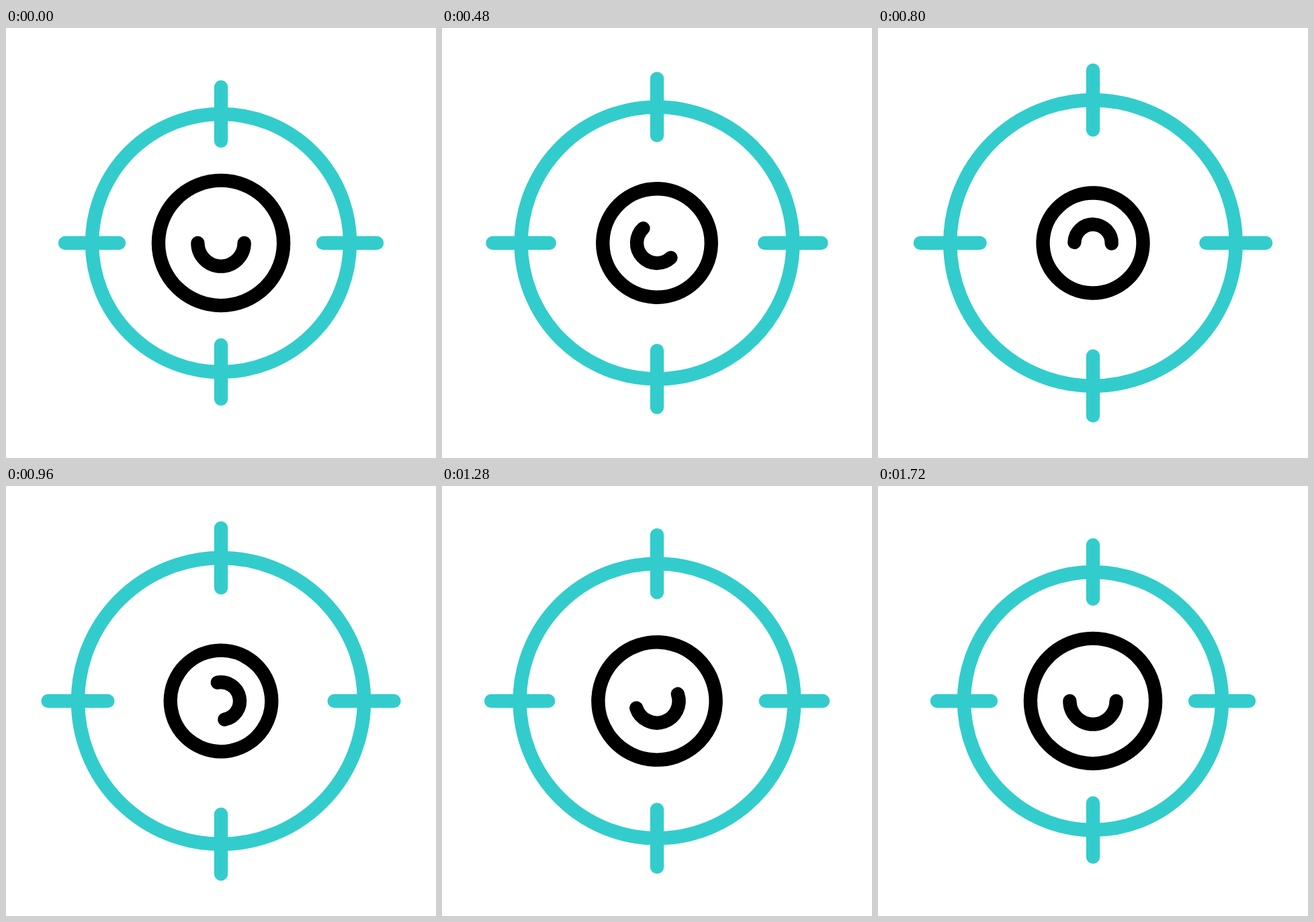
Recreate the animation shown at these times as an HTML page. Size 640 by 640 pixels, loop 1.8 s.

```html
<!DOCTYPE html>
<html lang="en">
<head>
<meta charset="utf-8">
<title>Target</title>
<style>
  html, body { margin: 0; width: 100%; height: 100%; overflow: hidden; background: #fff; }
  svg { display: block; width: 100%; height: 100%; }
  g { fill: none; stroke-linecap: round; }
</style>
</head>
<body>
<svg viewBox="-320 -320 640 640">
  <g id="sight" stroke="#33cccc">
    <circle r="192"/>
    <path d="M0-232V-152M0 152V232M-232 0H-152M152 0H232"/>
  </g>
  <g id="core" stroke="#000">
    <circle r="93.1"/>
    <path d="M-34.6 0A34.6 34.6 0 0 0 34.6 0"/>
  </g>
</svg>
<script>
const LOOP = 1800, STEP = 40, LINE = 20.4;
const sight = document.getElementById('sight');
const core = document.getElementById('core');

// Cubic Bezier ease (x1, 0, x2, 1), solved by bisection
function ease(x, x1 = 0.545, x2 = 0.415) {
  if (x <= 0) return 0;
  if (x >= 1) return 1;
  let lo = 0, hi = 1;
  for (let i = 0; i < 30; i++) {
    const s = (lo + hi) / 2, r = 1 - s;
    if (3 * x1 * s * r * r + 3 * x2 * s * s * r + s * s * s < x) lo = s;
    else hi = s;
  }
  return lo * lo * (3 - 2 * lo);
}

const ramp = (t, from, to) => ease((t - from) / (to - from));
const pulse = (t, from, mid, to) => ramp(t, from, mid) - ramp(t, mid, to);

// Scale and turn a group while its line weight stays constant
function pose(el, scale, angle) {
  el.setAttribute('transform', `rotate(${angle}) scale(${scale})`);
  el.setAttribute('stroke-width', LINE / scale);
}

function draw(time) {
  const t = Math.floor((time % LOOP) / STEP) * STEP;
  pose(sight, 1 + 0.11 * pulse(t, 82, 910, 1736), 0);
  pose(core, 1 - 0.2 * pulse(t, 40, 825, 1608), 360 * ramp(t, 40, 1600));
}

let start = null;
function tick(now) {
  if (start === null) start = now;
  draw(Math.max(0, now - start));
  requestAnimationFrame(tick);
}
draw(0);
requestAnimationFrame(tick);
</script>
</body>
</html>
```
